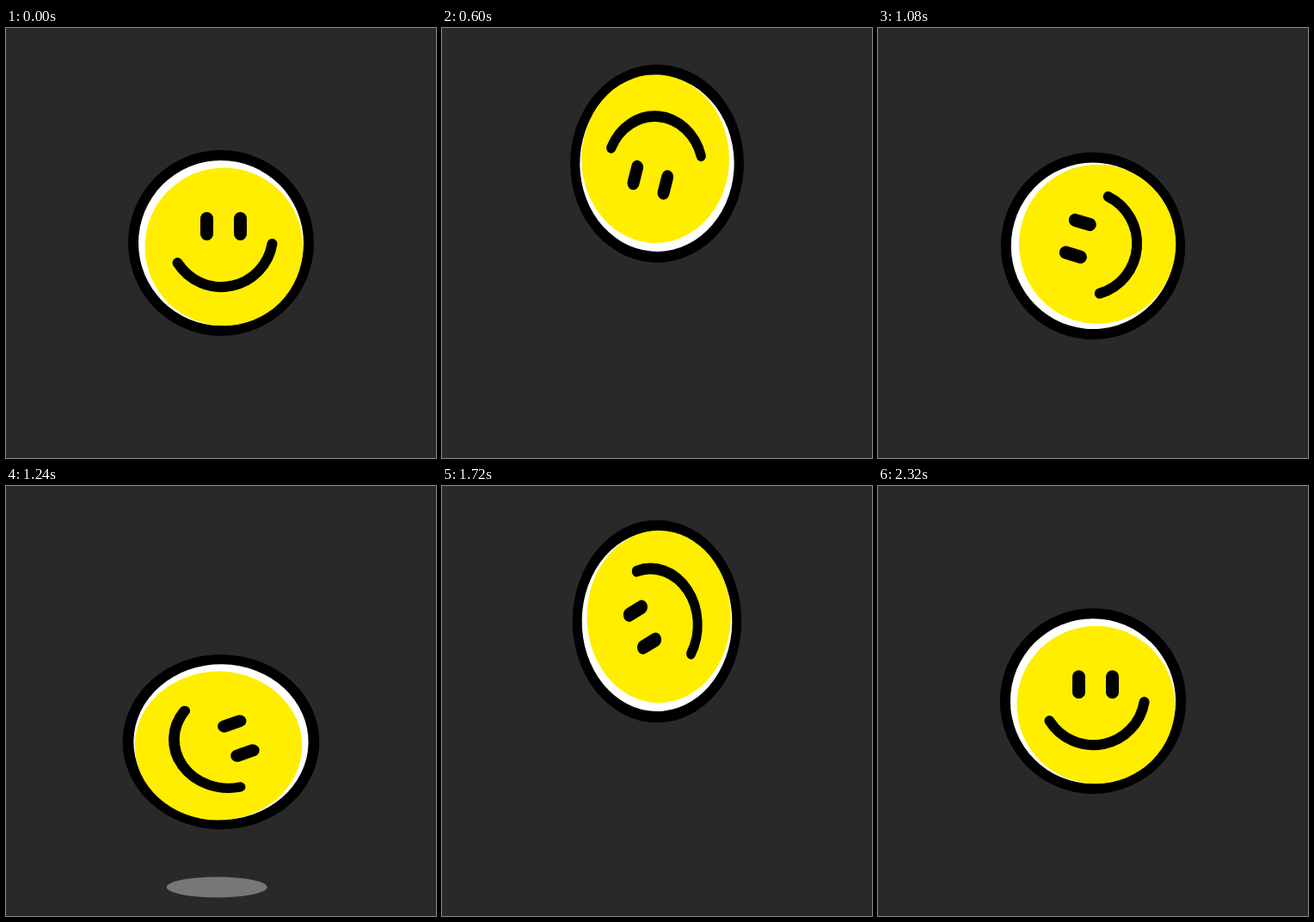
Animation of 500 by 500 pixels, one loop 2440 ms. Source, as an HTML page:

```html
<!DOCTYPE html>
<html lang="en">
<head>
<meta charset="utf-8">
<title>Bouncing smiley</title>
<style>
  html, body { margin: 0; height: 100%; overflow: hidden; background: #292929; }
  svg { display: block; width: 100%; height: 100%; }
</style>
</head>
<body>
<svg viewBox="0 0 500 500">
  <ellipse id="shadow" cx="245.2" cy="466.5" rx="58.5" ry="12" fill="#fff"/>
  <g id="ball">
    <circle r="108"/>
    <circle r="96" fill="#fff"/>
    <circle cx="3.4" cy="4.4" r="91.9" fill="#ffee00"/>
    <rect x="-24" y="-36" width="15" height="33" rx="7.5"/>
    <rect x="15" y="-36" width="15" height="33" rx="7.5"/>
    <path d="M-50.5 23A60 60 0 0 0 59.5 1" fill="none" stroke="#000" stroke-width="12" stroke-linecap="round"/>
  </g>
</svg>
<script>
const LOOP = 2440, STEP = 40, LAST = 2320;
const MIDDLE = 250, FLOOR = 362, PEAK = 141.8;

// Each key: time, height, squash (1 = wide, -1 = tall), rotation in degrees
const keys = [
  [0, MIDDLE, 0, 0],
  [375, FLOOR, 1, 0],
  [760, PEAK, -1, 211],
  [1196, FLOOR, 1, 360],
  [1600, PEAK, -1, 594],
  [2000, FLOOR, 1, 720],
  [2360, MIDDLE, 0, 720]
];

const ball = document.getElementById('ball');
const shadow = document.getElementById('shadow');
const easeIn = (x, power) => x ** power;
const easeOut = (x, power) => 1 - (1 - x) ** power;
const mix = (a, b, p) => a + (b - a) * p;

function pose(t) {
  const i = keys.findIndex(key => key[0] > t) - 1;
  const [t0, y0, squash0, turn0] = keys[i];
  const [t1, y1, squash1, turn1] = keys[i + 1];
  const x = (t - t0) / (t1 - t0);
  const falling = y1 > y0;
  const move = falling ? easeIn(x, i ? 2.2 : 3.7) : easeOut(x, 3);
  const squeeze = falling ? easeIn(x, i ? 2.5 : 3) : easeOut(x, 2);
  return {
    y: mix(y0, y1, move),
    squash: mix(squash0, squash1, squeeze) * 0.1,
    turn: mix(turn0, turn1, move)
  };
}

function draw(now) {
  const t = Math.min(LAST, Math.floor(now % LOOP / STEP) * STEP);
  const { y, squash, turn } = pose(t);
  ball.setAttribute('transform',
    `translate(250 ${y}) scale(${1 + squash} ${1 - squash}) rotate(${turn})`);
  shadow.setAttribute('opacity', 0.365 * Math.min(1, Math.max(0, (y - 255) / 35)));
}

function tick() {
  draw(performance.now());
  requestAnimationFrame(tick);
}
tick();
</script>
</body>
</html>
```
